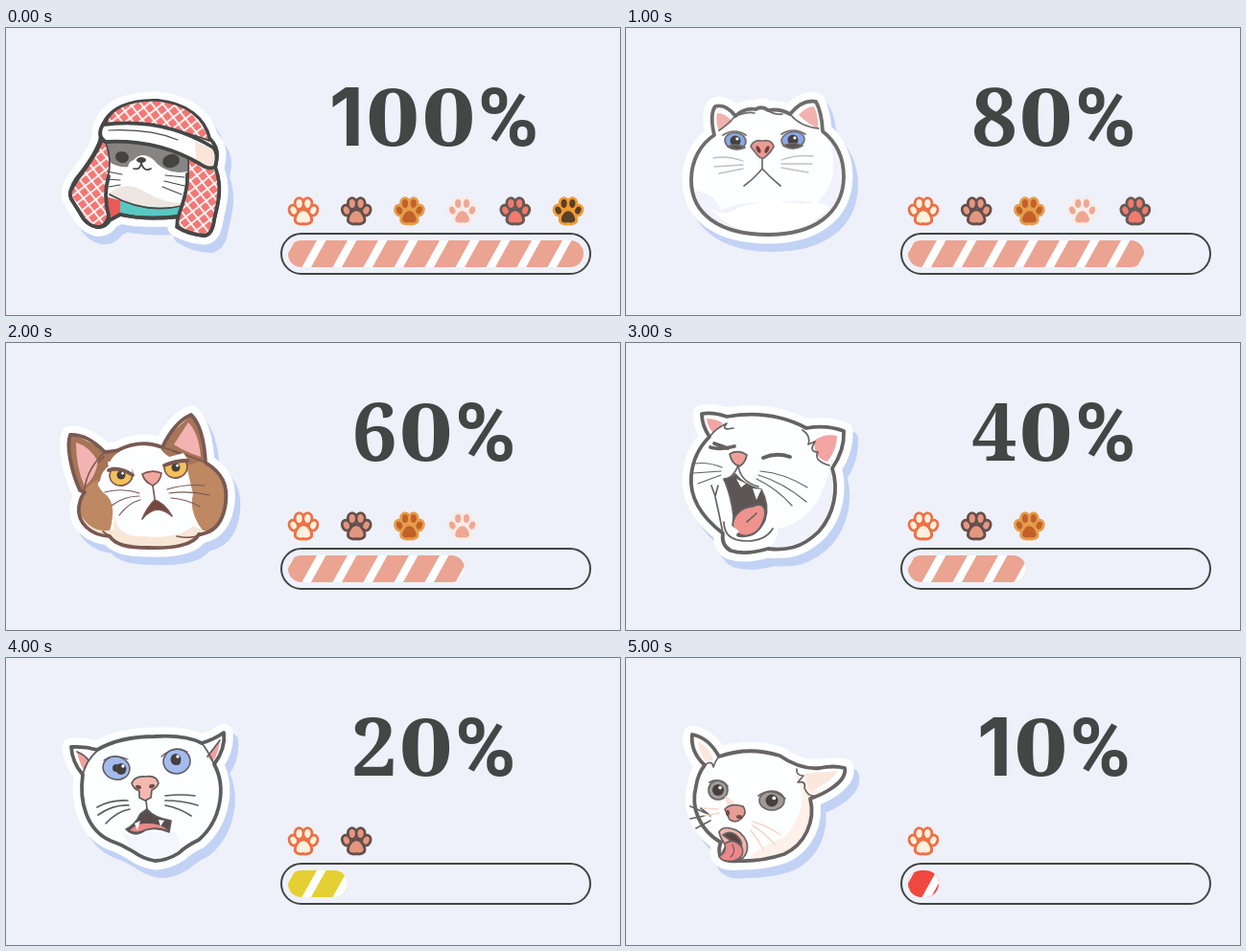
An HTML page for the animation above (6 s loop, 640 by 300 pixels).

```html
<!DOCTYPE html>
<html lang="en">
<head>
<meta charset="utf-8">
<title>Cat battery</title>
<style>
  html, body { margin: 0; width: 100%; height: 100%; overflow: hidden; background: #eef1fa; }
  svg { display: block; width: 100%; height: 100%; }
  path, line { stroke-linecap: round; stroke-linejoin: round; }

  .scene { visibility: hidden; animation: show 6s step-end infinite; animation-delay: calc((var(--i) - 6) * 1s); }
  @keyframes show { 0% { visibility: visible; } 16.6667%, 100% { visibility: hidden; } }

  .shadow { fill: #c2d2f5; stroke: #c2d2f5; stroke-width: 18; transform: translate(6px, 9px); }
  .rim { fill: #fcfeff; stroke: #fcfeff; stroke-width: 19; }
  .edge { fill: none; stroke: var(--ink); stroke-width: 3.8; }
  .thin { fill: none; stroke: var(--ink); stroke-width: 1.7; }
  .hair { fill: none; stroke: var(--ink); stroke-width: 1.2; }

  text { font: 700 84px "Noto Serif", serif; letter-spacing: 2px; text-anchor: middle; fill: #424644; }
  .one { font: 700 84px Inter, sans-serif; }
  .zero { font: 700 81px "DejaVu Serif", serif; }
  .percent { font: 700 86px Roboto, sans-serif; }

  .paw { fill: var(--pad); stroke: var(--fur); stroke-width: 6; paint-order: stroke; }
  .pads { stroke: none; }

  .level { animation: drain 6s step-end infinite; }
  @keyframes drain {
    0% { width: 308px; fill: #eaa491; }
    16.6667% { width: 246px; }
    33.3333% { width: 184px; }
    50% { width: 123px; fill: #eaa491; }
    66.6667% { width: 62px; fill: #e5d033; }
    83.3333%, 100% { width: 32px; fill: #f0483f; }
  }
  .stripes { animation-name: shorten; }
  @keyframes shorten {
    0% { width: 308px; }
    16.6667% { width: 246px; }
    33.3333% { width: 184px; }
    50% { width: 123px; }
    66.6667% { width: 62px; }
    83.3333%, 100% { width: 32px; }
  }
  .cover { animation: hide 6s step-end infinite; }
  @keyframes hide {
    0% { transform: translateX(330px); }
    16.6667% { transform: translateX(276px); }
    33.3333% { transform: translateX(221px); }
    50% { transform: translateX(166px); }
    66.6667% { transform: translateX(111px); }
    83.3333%, 100% { transform: translateX(56px); }
  }
</style>
</head>
<body>
<svg viewBox="0 0 640 300" preserveAspectRatio="none">
  <defs>
    <pattern id="check" width="9" height="9" patternUnits="userSpaceOnUse" patternTransform="rotate(52)">
      <rect width="9" height="9" fill="#f37774"/>
      <path d="M0 0H9M0 0V9" stroke="#fff" stroke-width="3.4"/>
    </pattern>
    <pattern id="slant" x="294" y="222" width="32" height="28" patternUnits="userSpaceOnUse">
      <path d="M14.5 28L30 0H39.500L24 28ZM-17.500 28L-2 0H7.500L-8 28Z" fill="#fcfeff"/>
    </pattern>
    <g id="paw">
      <ellipse cx="-10.3" cy="-1.4" rx="2.9" ry="4" transform="rotate(-20 -10.3 -1.4)"/>
      <ellipse cx="-4.4" cy="-8.5" rx="2.9" ry="4.2"/>
      <ellipse cx="4.4" cy="-8.5" rx="2.9" ry="4.2"/>
      <ellipse cx="10.3" cy="-1.4" rx="2.9" ry="4" transform="rotate(20 10.3 -1.4)"/>
      <path d="M0 -0.500C4 -0.500 6 4 7 7C8 11 4 12 0 11C-4 12 -8 11 -7 7C-6 4 -4 -0.500 0 -0.500Z"/>
    </g>
  </defs>
  <g id="faces"></g>
  <g id="paws"></g>
  <rect class="cover" y="174" width="330" height="36" fill="#eef1fa" x="280"/>
  <rect x="287" y="215" width="322" height="42" rx="21" fill="none" stroke="#404543" stroke-width="2"/>
  <rect class="level" x="294" y="222" height="28" rx="14"/>
  <rect class="level stripes" x="294" y="222" height="28" rx="14" fill="url(#slant)"/>
</svg>
<script>
const path = (d, fill) => `<path d="${d}" fill="${fill}"/>`;
const line = (d, kind = 'thin') => `<path class="${kind}" d="${d}"/>`;
const shape = (d, fill) => `<path class="thin" d="${d}" style="fill:${fill}"/>`;
const oval = (x, y, rx, ry, fill, turn = 0) =>
  `<ellipse cx="${x}" cy="${y}" rx="${rx}" ry="${ry}" fill="${fill}" transform="rotate(${turn} ${x} ${y})"/>`;
const eye = (x, y, rx, ry, iris, pupil, turn = 0) =>
  `<g stroke="var(--ink)" stroke-width="1.600">${oval(x, y, rx, ry, iris, turn)}</g>` +
  oval(x, y, pupil, pupil, '#45403f') + oval(x + pupil * .35, y - pupil * .4, pupil * .3, pupil * .3, '#fff');

const glyphClass = { 1: 'one', 0: 'zero', '%': 'percent' };
const lettering = label => [...label]
  .map(c => `<tspan class="${glyphClass[c] || 'digit'}">${c}</tspan>`).join('');

// patches are clipped to the outline; details lie on top of it
const faces = [
  {
    label: '100%', ink: '#454746',
    outline: 'M100 104C107 83 130 75 158 76C188 79 207 94 212 115Q221 124 220 134L218 148C225 166 222 180 217 200Q215 216 207 217Q190 216 178 208L181 197Q145 201 119 195L108 201Q104 209 94 208Q83 205 77 193L68 178Q65 170 73 158C82 147 93 132 98 118Z',
    patches:
      path('M103 118L200 130Q204 175 182 187Q145 193 110 178Z', '#fff') +
      path('M103 112L202 128L193 149Q177 154 163 146Q150 136 138 142Q122 150 106 139Z', '#878584') +
      path('M133 138Q142 128 154 138Q160 145 165 149L128 149Q125 141 133 138Z', '#fff') +
      path('M108 172Q126 158 146 172Q165 183 184 183V196H108Z', '#eee6e0') +
      path('M103 176L122 181L118 200L102 206Z', '#e95a5a') +
      path('M119 180Q145 190 184 187L182 201Q145 201 119 195Z', '#58c8c3'),
    details:
      line('M108 174Q145 195 183 186') + line('M119 195Q145 201 181 197', 'edge') +
      shape('M99 118C91 139 77 152 69 167Q64 174 70 182L77 193Q84 208 98 208Q106 205 107 196Q101 175 106 157Q111 138 104 120Z', 'url(#check)') +
      shape('M190 134Q198 137 218 147C225 166 222 180 217 200Q215 217 206 217Q190 215 179 208Q177 202 182 190Q192 161 190 134Z', 'url(#check)') +
      shape('M103 104C107 83 130 75 158 76C188 79 207 94 212 118Q165 99 103 104Z', 'url(#check)') +
      line('M99 119C91 139 77 152 69 167Q64 174 70 182L77 193Q84 208 98 208Q106 205 107 196Q101 175 107 155M219 148C225 166 222 180 217 200Q215 217 206 217Q190 215 179 208Q177 202 182 190Q190 167 189 153', 'edge') +
      shape('M101 101Q164 93 216 125Q222 131 218 145Q212 149 202 142Q158 116 104 119Q94 113 101 101Z', '#fff') +
      path('M197 119Q214 125 217 131L216 144Q209 147 198 138Z', '#fae5d8') +
      line('M101 101Q164 93 216 125Q222 131 218 145Q212 149 202 142Q158 116 104 119Q94 113 101 101Z', 'edge') +
      line('M107 107Q150 105 179 117', 'hair') +
      oval(121, 135, 7, 6, '#444443', 15) + oval(172, 139, 9, 7, '#444443', -15) +
      oval(141, 138, 5, 3, '#444443') + line('M141 141Q140 149 133 147M141 141Q144 151 151 147') +
      line('M105 150L121 153M104 158L119 159M107 166L119 164M166 154L186 156M165 160L186 165M163 166L183 174', 'hair')
  },
  {
    label: '80%', ink: '#706c6b',
    outline: 'M92 112Q87 90 93 82Q104 79 114 92Q124 83 135 85Q142 81 148 86Q161 84 171 90Q184 74 198 77Q204 88 205 108C219 119 227 136 227 156C226 195 195 216 148 216C97 216 68 194 68 159C68 138 78 121 92 112Z',
    patches:
      path('M68 170Q90 170 99 190Q125 180 147 184Q184 177 198 184Q225 160 212 116L232 130V220H65Z', '#f1f2fb') +
      path('M88 188Q102 199 117 188Q146 178 183 184Q206 181 212 187Q190 214 148 214Q107 214 88 188Z', '#fff') +
      path('M95 89Q104 89 111 98L97 108Q93 99 95 89ZM180 91Q188 82 196 82Q201 92 200 105Q191 101 180 91Z', '#f2b2ae'),
    details:
      line('M97 107Q105 102 114 92M171 90Q181 103 201 105M117 91Q128 87 134 89M148 86Q154 91 163 90') +
      eye(114, 118, 11, 8.5, '#89a8ea', 5.5, 8) + eye(174, 117, 12, 8.5, '#89a8ea', 5.5, -8) +
      shape('M106 124Q115 120 124 125Q114 129 106 124ZM164 123Q174 118 184 123Q174 129 164 123Z', '#5b5351') +
      line('M101 112Q113 104 125 112M162 111Q174 103 187 111') +
      shape('M130 124Q133 116 142 118Q152 116 154 124Q151 130 146 134Q142 139 137 133Z', '#ec9a94') +
      oval(138, 127, 2, 4, '#713f3e', -25) + oval(147, 127, 2, 4, '#713f3e', 25) +
      line('M142 136V147Q134 157 123 165M142 147Q150 156 161 165') +
      '<g stroke="#c4c1c1" fill="none" stroke-width="1.300"><path d="M91 136Q105 133 122 139M92 145L122 143M97 152L122 147M162 138Q178 132 195 134M162 142L194 142M162 146L190 151"/></g>'
  },
  {
    label: '60%', ink: '#795952',
    outline: 'M77 154C67 132 63 106 67 96Q84 95 103 114Q112 113 117 112Q140 100 163 109Q175 83 193 75Q206 88 208 125C226 136 231 149 229 167Q226 190 212 197Q205 200 201 200C196 211 174 215 149 214C126 214 114 211 108 202C88 201 74 188 76 171Q78 160 82 156Z',
    patches:
      path('M60 90L103 112L119 113Q107 121 108 128Q99 134 98 144L80 162L65 165ZM162 103L196 73L215 130L195 138Q190 130 184 120Q172 124 162 112Z', '#a67456') +
      path('M72 160L96 142Q94 149 101 156Q113 164 111 181Q110 195 104 206L65 205ZM188 128L208 122L235 130V200L205 196Q190 176 195 158Z', '#bd8862') +
      path('M76 176Q88 201 112 195L113 182Q118 204 143 202Q177 206 196 191L207 198Q186 218 149 216Q121 216 108 204L76 200Z', '#f8e6d6') +
      path('M73 104Q87 108 96 124Q93 141 82 150Q73 131 73 104ZM190 83Q201 94 203 119Q187 114 175 106Z', '#f3b3b3'),
    details:
      line('M82 153Q84 132 103 114M163 109Q184 115 208 125M96 125L102 119M172 112L181 116M178 202Q196 206 212 197M108 202L101 197') +
      eye(120, 138, 12, 11, '#f4c05c', 4.5, -15) + eye(177, 130, 12, 11, '#f4c05c', 4.5, -15) +
      path('M107 131Q118 127 132 137L130 124H106ZM165 127Q175 121 189 121L185 115L163 121Z', '#fcfeff') +
      line('M107 133Q118 129 132 138M165 128Q176 123 189 123', 'edge') +
      shape('M142 137Q152 132 162 136Q161 145 153 149Q144 145 142 137Z', '#f0a9a0') +
      line('M153 149L155 163') +
      shape('M142 184Q147 172 155 164Q165 167 173 181Q167 175 158 174Q149 175 142 184Z', '#754542') +
      line('M103 156Q121 151 139 157M110 170Q123 160 139 160M118 180Q128 167 140 164M168 153Q187 147 207 149M170 157Q190 154 212 159M172 162Q188 163 202 171', 'hair')
  },
  {
    label: '40%', ink: '#656362',
    outline: 'M79 74Q91 72 105 77Q151 69 188 89Q209 85 227 92Q228 112 215 131C222 153 217 179 201 197C183 215 166 217 148 215Q125 222 109 217Q99 211 101 199C79 182 66 163 68 139Q70 115 87 98Q79 86 79 74Z',
    patches:
      path('M215 120Q203 186 158 194Q160 207 145 217L222 214Z', '#f0f1fb') +
      path('M84 79Q94 79 101 84L91 94Q85 88 84 79ZM196 102Q207 94 220 97Q220 111 210 124Q196 121 196 102Z', '#f2a5a3'),
    details:
      line('M87 98Q94 89 105 84Q98 92 112 89M184 91Q193 97 190 106L197 103Q190 114 200 114Q195 123 212 128') +
      line('M88 109Q98 112 113 108M92 105L106 110M143 120Q157 114 171 119', 'edge') +
      shape('M108 116Q117 111 126 117Q124 126 118 129Q110 126 108 116Z', '#f0a09a') +
      line('M117 128Q112 141 102 143M117 128Q119 145 138 150') +
      shape('M102 142Q111 141 114 137Q123 149 141 153Q150 170 145 185Q136 205 117 202Q110 195 112 181Q110 161 102 142Z', '#5d5657') +
      shape('M111 190Q114 173 132 171Q145 165 145 179Q141 199 127 201Q115 203 111 190Z', '#f0938f') +
      line('M126 187Q133 181 136 178') +
      path('M115 142L120 151L125 147ZM132 152L136 164L141 153ZM89 149L96 149L95 161ZM108 189L113 202L118 197Z', '#fff') +
      line('M89 149L93 160L96 149M102 187Q102 207 126 207Q145 207 153 194M101 199Q97 178 93 161') +
      line('M72 126Q85 124 100 130M70 136L99 134M75 147L99 138M140 134Q165 136 189 151M138 138Q164 146 188 166M136 142Q157 152 173 170', 'hair')
  },
  {
    label: '20%', ink: '#5d5d5d',
    outline: 'M68 93Q82 92 95 96Q119 82 155 82Q187 80 204 89Q217 85 227 78Q229 95 217 111C230 135 224 170 201 190Q187 197 180 204Q167 212 155 212Q143 210 132 202Q121 195 109 191C84 180 76 150 80 122Q69 109 68 93Z',
    patches:
      path('M121 182Q137 189 148 181L172 182Q183 183 180 204Q160 214 142 208Q126 198 121 182Z', '#f3f6fc') +
      path('M74 98Q82 101 86 107L82 119Q76 109 74 98ZM210 103L223 86Q222 99 215 109Z', '#ef9f9c'),
    details:
      line('M80 122Q83 108 95 97M74 98Q82 101 86 107M204 89Q210 96 217 111M210 103L223 86') +
      eye(115, 115, 14, 12, '#a4bbf0', 4, 15) + eye(178, 108, 14, 13, '#a4bbf0', 4, -10) +
      oval(120, 116, 5.5, 6, '#45403f') + oval(177, 106, 5.5, 6, '#45403f') +
      oval(122, 113, 1.7, 1.7, '#fff') + oval(179, 103, 1.7, 1.7, '#fff') +
      line('M102 107Q111 99 127 106M162 103Q175 91 189 98', 'hair') +
      shape('M131 131Q134 123 145 124Q157 122 159 131Q157 136 152 138L151 146L145 149L139 146V139Q133 137 131 131Z', '#f5b8b0') +
      oval(138, 135, 3, 2, '#6c4b4a', 20) + oval(152, 134, 3, 2, '#6c4b4a', -20) +
      line('M146 149L147 158') +
      shape('M125 179Q135 174 140 163L147 158Q154 167 172 170L170 182Q157 176 145 180Q134 188 125 179Z', '#584e4f') +
      path('M129 180Q137 172 146 173Q160 172 169 180Q157 175 145 179Q136 184 129 180Z', '#e88b8c') +
      path('M134 173L137 180L140 170ZM159 169L161 176L165 170Z', '#fff') +
      line('M95 156Q109 148 127 149M96 164Q112 153 128 154M104 173Q116 160 129 158M166 144Q182 142 197 144M166 149Q184 149 200 154M166 154Q181 157 193 165')
  },
  {
    label: '10%', ink: '#686463',
    outline: 'M69 80Q86 83 97 103Q128 92 160 102Q182 117 202 115Q216 112 228 115Q230 126 213 137Q204 143 192 147C198 171 186 195 165 205Q141 213 117 212Q103 214 98 207Q96 198 99 193C77 180 67 157 73 134Q75 121 82 112Q67 98 69 80Z',
    patches:
      path('M176 122Q195 154 165 187Q140 196 127 211L190 215L203 140ZM72 150Q80 181 101 192L93 205L60 165Z', '#fdf1e9') +
      path('M75 87Q88 94 91 106L84 109Q76 100 75 87ZM185 121L221 118Q213 130 192 140Z', '#fce7dd'),
    details:
      line('M82 112Q90 106 91 114Q94 106 97 103M178 116Q177 123 185 123L179 130Q188 128 186 136Q190 146 199 144') +
      eye(96, 138, 10, 10, '#a19b98', 6) + eye(152, 149, 13, 10, '#a19b98', 6.5) +
      line('M87 130Q96 124 106 134M138 144Q152 134 166 147') +
      path('M103 144Q111 148 113 153L106 157Z', '#fae1d5') +
      shape('M103 158Q109 151 122 155Q127 162 120 168Q115 173 108 169Z', '#e79d96') +
      oval(106, 162, 2, 3, '#714b49') + oval(118, 166, 3, 2, '#714b49') +
      shape('M97 182Q100 176 109 178Q121 180 126 193Q128 203 122 209Q111 216 100 209Q99 203 105 196Q99 191 97 182Z', '#eeb6ac') +
      shape('M101 185Q111 178 119 190Q122 196 119 199Q110 191 101 185Z', '#5a4543') +
      shape('M103 194Q112 187 121 198Q124 209 112 212Q100 214 97 207Q105 204 103 194Z', '#ed868a') +
      line('M111 195Q115 203 109 208', 'hair') +
      line('M67 155L83 162M67 168L82 165M73 178L88 170M78 157L88 165') +
      '<path d="M80 157L96 158M82 165L97 162M132 171Q149 176 161 185M132 175Q146 184 155 195M130 180Q138 190 143 200" fill="none" stroke="#f7d8c8" stroke-width="1.500"/>'
  }
];

const pawColors = [
  ['#ef7045', '#fff1dd'], ['#65504d', '#e5967f'], ['#e59d4b', '#c2602a'],
  ['#f7ece5', '#eea795'], ['#625a58', '#f07a6c'], ['#f19a31', '#59402a']
];

document.getElementById('faces').innerHTML = faces.map((face, i) => `
  <g class="scene" style="--i:${i};--ink:${face.ink}">
    <clipPath id="clip${i}"><path d="${face.outline}"/></clipPath>
    <path class="shadow" d="${face.outline}"/>
    <path class="rim" d="${face.outline}"/>
    <g clip-path="url(#clip${i})">${face.patches}</g>
    <path class="edge" d="${face.outline}"/>
    ${face.details}
    <text x="447" y="123">${lettering(face.label)}</text>
  </g>`).join('');

document.getElementById('paws').innerHTML = pawColors.map(([fur, pad], i) => `
  <g transform="translate(${310 + i * 55.2} 192)" style="--fur:${fur};--pad:${pad}">
    <g class="paw"><use href="#paw"/></g>
    <g class="paw pads"><use href="#paw"/></g>
  </g>`).join('');
</script>
</body>
</html>
```
